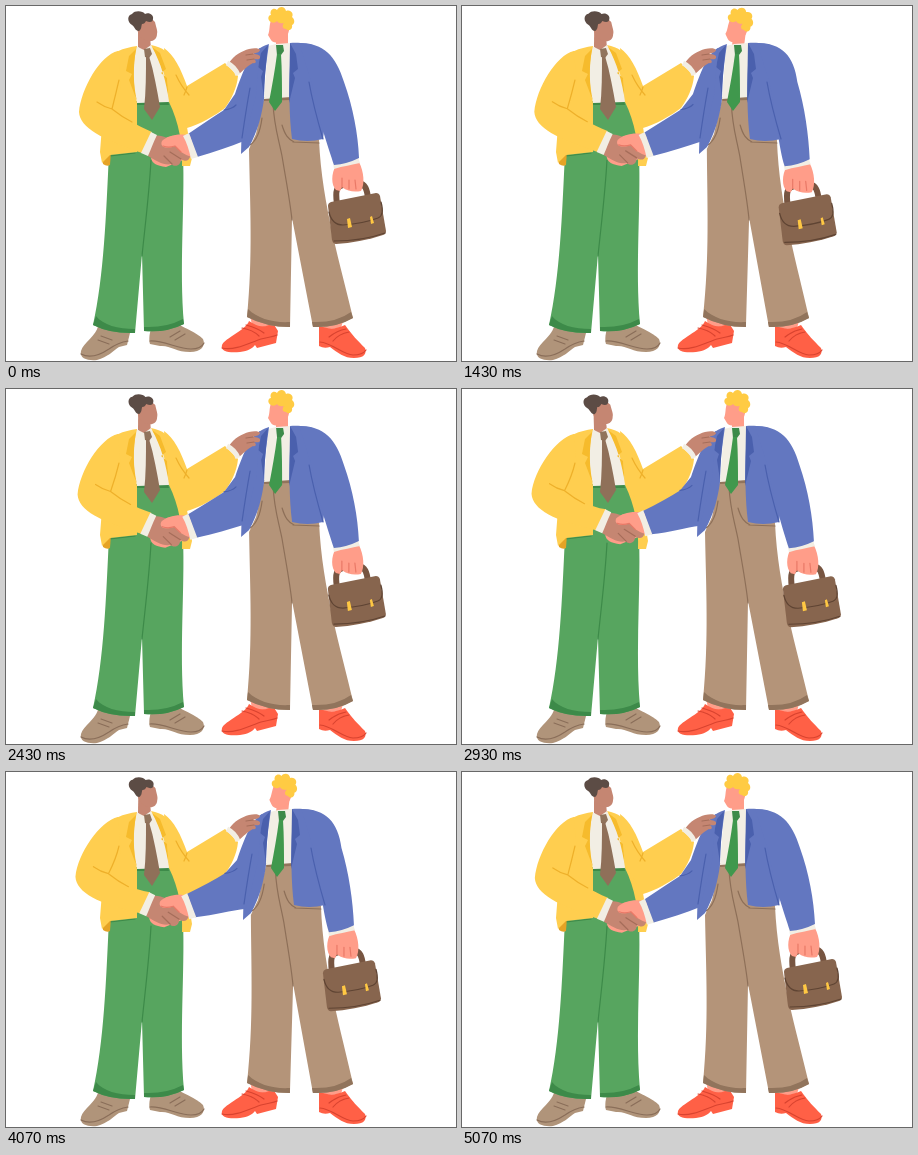
Write an HTML page that moves like this. It is 450 by 355 pixels and loops after 5.11 s.

```html
<!DOCTYPE html>
<html lang="en">
<head>
<meta charset="utf-8">
<title>Handshake</title>
<style>
html, body { margin: 0; width: 100%; height: 100%; overflow: hidden; background: #fff; }
svg { display: block; width: 450px; height: 355px; }
path { stroke-linecap: round; stroke-linejoin: round; }
.line { fill: none; stroke-width: 1.2; }
.yellow { fill: #ffce4f; } .yellowDark { fill: #f6bb2c; } .lining { fill: #e5a326; }
.blue { fill: #6377c0; } .blueDark { fill: #4a60ad; }
.green { fill: #57a55f; } .greenDark { fill: #3d8a49; }
.tan { fill: #b49479; } .tanDark { fill: #91745c; }
.shirt { fill: #f2eee4; }
.brown { fill: #c58672; } .peach { fill: #ff9d89; }
.taupe { fill: #b0947a; } .red { fill: #ff6046; }
.bag { fill: #87654e; }
.hair { fill: #5c4c45; } .blond { fill: #ffcb43; }
.sYellow { stroke: #eeb02a; } .sBlue { stroke: #4a60ad; }
.sGreen { stroke: #3d8a49; } .sTan { stroke: #8d6f58; }
.sBrown { stroke: #a56d5a; } .sPeach { stroke: #e97967; }
.sTaupe { stroke: #8a6e59; } .sRed { stroke: #d9432f; }
.sBag { stroke: #5f4433; } .sShirt { stroke: #f2eee4; }
</style>
</head>
<body>
<svg viewBox="0 0 450 355" xmlns="http://www.w3.org/2000/svg">
  <!-- shoes -->
  <path class="taupe" d="M92 320C91 329 77 337 75 345C73 353 83 355 91 354C102 351 107 345 113 341L121 339L124 327Z"/>
  <path class="line sTaupe" d="M75 348C84 353 94 349 103 343C110 338 115 336 122 335M95 330L106 334M92 334L103 338"/>
  <path class="taupe" d="M145 323C143 329 143 335 144 338L154 340C164 339 170 346 184 346C195 346 200 340 197 333C190 326 180 323 172 318Z"/>
  <path class="line sTaupe" d="M144 335C157 334 172 343 185 343C192 343 196 341 198 337M164 331L174 325M169 334L179 328"/>
  <path class="peach" d="M244 309L270 314L264 322L246 319Z"/>
  <path class="red" d="M243 315C240 324 219 332 216 339C214 346 224 347 234 346C242 345 247 342 249 339L251 342L270 337L272 325L267 317C258 323 250 320 243 315Z"/>
  <path class="line sRed" d="M216 342C229 345 243 337 255 333C262 331 267 331 271 329M236 322C242 323 249 326 253 330M240 319C247 321 253 323 258 327"/>
  <path class="peach" d="M314 315L338 312L335 322L319 323Z"/>
  <path class="red" d="M313 319L313 340Q318 343 324 341C332 347 338 352 348 352C358 352 361 348 359 342C352 335 346 329 339 319C329 324 320 323 313 319Z"/>
  <path class="line sRed" d="M314 336C326 337 336 348 347 349C354 349 358 347 360 344M327 335C331 330 337 327 343 326M323 331C328 327 334 324 340 323"/>

  <!-- trousers -->
  <g id="legsL">
    <path class="green" d="M130 95L163 95L177 118L177 148C179 200 173 262 178 318Q160 327 138 325L136 248L129 327Q105 328 87 319C98 270 100 210 103 147L130 140Z"/>
    <path class="greenDark" d="M87 319L90 310C97 319 112 323 129 323L129 327Q105 328 87 319ZM138 325L138 321Q160 322 177 313L178 318Q160 327 138 325Z"/>
    <path class="greenDark" d="M131 95L162 95L163 99L131 99Z"/>
    <path class="line sGreen" d="M145 154C143 190 139 220 136 250M104 150L129 147"/>
  </g>
  <g id="legsR">
    <path class="tan" d="M258 91L284 91L313 134C316 200 335 260 347 312Q330 322 307 321L286 212L284 321Q260 321 241 311C247 250 244 200 243 143L250 128Z"/>
    <path class="tanDark" d="M241 311L242 303C252 313 268 317 284 316L284 321Q260 321 241 311ZM307 321L306 316Q330 317 345 306L347 312Q330 322 307 321Z"/>
    <path class="tanDark" d="M258 91L284 90L284 94L258 95Z"/>
    <path class="line sTan" d="M267 97C268 120 272 130 276 150C281 180 284 195 286 214M256 112C254 128 250 135 244 139M276 119C279 129 282 133 288 136M287 136L313 137"/>
  </g>

  <!-- heads -->
  <g id="headL">
    <path class="brown" d="M132 20L144 31L145 42L138 47L132 41Z"/>
    <path class="brown" d="M131 15C136 10 146 12 149 16C150 21 152 25 151 28C151 33 147 36 142 35C134 33 130 27 131 15Z"/>
    <path class="hair" d="M126 19C121 16 121 9 126 8C129 4 137 5 139 8C143 6 148 9 147 13C147 16 144 17 140 15C139 17 138 18 136 18C135 20 136 23 133 25C129 25 129 21 126 19Z"/>
  </g>
  <g id="headR">
    <path class="peach" d="M270 27L282 25L282 41L270 42Z"/>
    <path class="peach" d="M265 14C263 20 264 25 262 29C263 31 264 32 265 34C267 38 275 37 279 32C285 27 284 16 281 12Z"/>
    <path class="blond" d="M265 16C261 14 262 9 265 9C263 4 268 1 271 4C273 0 279 0 280 5C285 3 288 8 286 11C289 13 289 18 286 19C287 23 283 26 280 23C276 23 276 19 278 17C273 18 272 16 271 15C269 17 267 17 265 16Z"/>
  </g>

  <!-- right torso -->
  <g id="torsoR">
    <path class="shirt" d="M262 40L270 38L284 37L285 91L258 93Z"/>
    <path class="greenDark" d="M270 39L277 39L278 45L275 49L271 49Z"/>
    <path fill="#40984d" d="M271 48L275 48C276 64 276 80 276 96L269 105L263 96C266 80 269 64 271 48Z"/>
    <path class="blue" d="M263 38C253 41 247 46 243 57L236 110L235 148L243 141C252 125 256 108 258 93C258 75 260 58 263 38Z"/>
    <path class="blue" d="M284 37C300 36 318 39 325 56L321 100L317 133Q301 137 286 133C283 110 283 80 284 60Z"/>
    <path class="blueDark" d="M262 39L255 47L252 61L257 65L255 71L258 91C258 74 260 57 262 39ZM284 37L290 48L292 63L287 67L289 72L283 97Z"/>
  </g>

  <!-- left torso -->
  <g id="torsoL">
    <path class="shirt" d="M130 40L138 44L145 39L160 68L163 96L131 97L125 68Z"/>
    <path class="tanDark" d="M138 43L144 42L146 48L143 52L139 51Z"/>
    <path fill="#8f7059" d="M140 50L143 50C148 66 151 84 154 101L146 114L138 103C140 86 140 67 140 50Z"/>
    <path class="lining" d="M95 145L97 158Q101 161 104 159L105 145Z"/>
    <path class="yellow" d="M131 40C118 42 104 46 98 57L96 120L94 146L96 157L104 149L131 146L131 97C127 80 126 60 131 40Z"/>
    <path class="yellow" d="M145 39C156 41 164 46 170 60L181 121L186 152L184 160L176 160C177 140 173 116 163 96C162 75 155 55 145 39Z"/>
    <path class="yellowDark" d="M130 43L123 50L120 65L126 68L123 74L131 95C127 79 127 60 130 43ZM146 41L154 47L160 63L155 67L161 72L163 95C160 75 155 57 146 41Z"/>
  </g>

  <path id="farSleeve" class="yellow"/>
  <path id="farCrease" class="line sYellow"/>

  <!-- clasped hands -->
  <path id="nearSleeve" class="yellow"/>
  <path id="nearCrease" class="line sYellow"/>
  <path id="blueSleeve" class="blue"/>
  <path id="blueCrease" class="line sBlue"/>
  <g id="grip">
    <path class="peach" d="M184 131C174 128 162 130 157 134L160 146L145 151C145 157 151 160 160 161L182 152L189 149Z"/>
    <path class="brown" d="M147 130C156 128 163 133 169 136C177 141 184 147 184 151C183 155 179 156 175 153C175 159 170 162 165 158C159 160 150 155 142 150Z"/>
    <path class="peach" d="M184 130C175 127 162 129 156 135C153 142 162 143 169 140L175 146C180 149 185 152 190 149Z"/>
    <path class="line sBrown" d="M164 146L175 153M158 150L166 158"/>
    <path class="line sPeach" d="M157 140C162 142 166 141 169 140L175 146"/>
    <path class="shirt" d="M145 126L151 129C147 137 145 143 142 150L135 147Z"/>
    <path class="shirt" d="M177 130L183 127L192 151L185 153C183 144 181 137 177 130Z"/>
  </g>

  <!-- briefcase arm -->
  <g id="case">
    <path class="line" stroke="#775541" style="stroke-width:6;stroke-linecap:butt" d="M331 198C329 184 331 180 337 179L353 177C359 178 361 183 362 192"/>
    <path class="bag" d="M325 196L370 187Q373 187 374 190L380 225Q380 228 377 229C362 234 345 237 330 238Q327 238 326 234L322 200Q322 197 325 196Z"/>
    <path class="line sBag" d="M323 206C325 215 329 219 337 219C352 218 364 215 372 212C377 210 377 203 375 196M328 235C345 235 362 233 379 227"/>
    <path fill="#ffc843" d="M341 213L344 212L346 221L342 222ZM364 211L366 210L368 217L365 218Z"/>
    <path class="peach" d="M330 159C325 168 325 179 330 184L334 185L336 181C342 186 349 186 355 185C359 178 358 166 353 156Z"/>
    <path class="line sPeach" d="M336 181L336 172M343 183L343 174M350 183L349 174"/>
    <path class="shirt" d="M327 157C335 157 344 154 352 151L354 157C346 159 337 160 328 163Z"/>
  </g>
  <path id="caseSleeve" class="blue"/>
  <path id="caseCrease" class="line sBlue"/>

  <!-- hand on the shoulder -->
  <path id="palm" class="brown"/>
  <path id="knuckles" class="line sBrown"/>
  <path id="patCuff" class="line sShirt" style="stroke-width:5;stroke-linecap:butt"/>
</svg>
<script>
const LOOP = 5110, HALF = LOOP / 2;
const el = id => document.getElementById(id);
const shape = (id, d) => el(id).setAttribute('d', d);
const place = (id, t) => el(id).setAttribute('transform', t);

// [time, value] steps joined by cosine easing, repeated twice per loop
const shakeSteps = [[0, .5], [330, 0], [610, 1], [920, 0], [1270, 1], [1560, 0], [1930, 1], [2250, 0], [HALF, .5]];
const patSteps = [[0, 0], [480, 0], [760, 1], [880, 1], [1090, 0], [HALF, 0]];
const leanLSteps = [[0, 0], [400, 0], [820, 1], [1050, 1], [1450, 0], [HALF, 0]];
const leanRSteps = [[0, 0], [800, 0], [1450, 1], [2000, 1], [2500, 0], [HALF, 0]];
const tiltSteps = [[0, 0], [650, 0], [1450, 1], [2200, 0], [HALF, 0]];

// resting and lifted outlines share their commands
const palmDown = 'M223 57C228 49 236 45 243 43C248 42 253 42 254 44C254 46 250 47 247 48C251 48 255 49 254 52C253 54 250 53 248 53C251 55 250 58 247 57C241 60 238 64 233 68Z';
const palmUp = 'M212 52C214 44 218 38 225 33C229 29 235 23 238 26C239 29 236 32 234 34C237 30 241 27 243 30C244 33 241 36 239 39C242 37 245 39 242 42C238 48 231 51 226 59Z';

function track(steps, t) {
  const i = Math.max(1, steps.findIndex(s => s[0] >= t));
  const [t0, a] = steps[i - 1], [t1, b] = steps[i];
  return a + (b - a) * (1 - Math.cos(Math.PI * (t - t0) / (t1 - t0))) / 2;
}

function blend(a, b, k) {
  const ends = b.match(/-?[\d.]+/g);
  let i = 0;
  return a.replace(/-?[\d.]+/g, n => +n + (ends[i++] - n) * k);
}

const shift = (dx, dy) => (x, y) => `${x + dx} ${y + dy}`;

// shear with the hem standing still
const shear = (dx, hem, waist) => {
  const k = -dx / (hem - waist);
  return `matrix(1 0 ${k} 1 ${-k * hem} 0)`;
};

function draw(time) {
  const t = time % HALF, wave = 2 * Math.PI * t / HALF;
  const shake = track(shakeSteps, t) - .5;
  const pat = track(patSteps, t);
  const leanL = -2 * track(leanLSteps, t), leanR = 2 * track(leanRSteps, t);
  const swing = -2.75 * (1 - Math.cos(wave));
  const left = shift(leanL, 0), right = shift(leanR, 0);

  place('legsL', shear(leanL, 320, 130));
  place('legsR', shear(leanR, 315, 130));
  place('torsoL', `translate(${leanL})`);
  place('torsoR', `translate(${leanR})`);
  place('headL', `translate(${leanL * .2}) rotate(${-2 * Math.sin(wave)} 139 40)`);
  place('headR', `rotate(${7 * track(tiltSteps, t)} 273 40)`);

  const gx = 4 * shake, gy = 13 * shake, grip = shift(gx, gy);
  place('grip', `translate(${gx} ${gy})`);
  const elbow = shift(73 + 8 * shake, 106 + 3 * shake);
  shape('nearSleeve', `M${left(112, 45)}C${left(94, 49)} ${elbow(2, -23)} ${elbow(0, 0)}` +
    `C${elbow(1, 16)} ${elbow(23, 27)} ${grip(136, 147)}L${grip(146, 126)}` +
    `C${elbow(57, 13)} ${elbow(42, 4)} ${elbow(33, -2)}L${left(115, 82)}Z`);
  shape('nearCrease', `M${left(113, 74)}Q${left(110, 87)} ${elbow(33, -3)}` +
    `Q${elbow(43, 5)} ${elbow(53, 10)}M${elbow(33, -3)}Q${elbow(25, -5)} ${elbow(18, -10)}`);

  const bend = shift(leanR * .5, 6 * shake);
  shape('blueSleeve', `M${right(254, 42)}C${right(243, 48)} ${right(236, 68)} ${right(229, 88)}L${bend(218, 104)}` +
    `Q${bend(204, 113)} ${grip(182, 128)}L${grip(191, 151)}` +
    `C${bend(208, 146)} ${bend(224, 141)} ${right(238, 135 + 4 * -shake)}L${right(250, 90)}Z`);
  shape('blueCrease', `M${right(244, 82)}Q${right(240, 104)} ${right(236, 132)}M${bend(218, 104)}Q${bend(226, 103)} ${bend(230, 99)}`);

  shape('palm', blend(palmDown, palmUp, pat));
  shape('knuckles', blend('M247 48L240 49M248 53L241 54', 'M234 34L229 39M239 39L233 44', pat));
  shape('patCuff', blend('M221 57Q229 61 232 69', 'M212 51Q220 54 225 61', pat));
  shape('farSleeve', `M${left(158, 42)}C${left(168, 49)} ${left(175, 63)} ${left(181, 80)}` +
    blend('L219 57L232 70C231 82', 'L210 52L224 63C222 80', pat) +
    ` ${left(225, 94)} ${left(219, 102)}C${left(210, 109)} ${left(193, 119)} ${left(181, 122)}L${left(163, 92)}Z`);
  shape('farCrease', `M${left(170, 69)}Q${left(175, 80)} ${left(183, 89)}M${left(181, 81)}Q${left(180, 85)} ${left(178, 89)}`);

  const hang = shift(swing, -.25 * swing);
  place('case', `translate(${swing} ${-.25 * swing})`);
  shape('caseSleeve', `M${right(293, 37)}C${right(318, 37)} ${right(330, 50)} ${338 + swing * .5} 76` +
    `C${347 + swing * .8} 101 ${hang(352, 128)} ${hang(353, 152)}Q${hang(341, 158)} ${hang(328, 159)}` +
    `C${hang(322, 140)} ${right(313, 116)} ${right(306, 78)}Z`);
  shape('caseCrease', `M${right(303, 76)}C${right(307, 99)} ${right(312, 116)} ${right(317, 133)}`);
}

function frame() {
  draw(performance.now() % LOOP);
  requestAnimationFrame(frame);
}
frame();
</script>
</body>
</html>
```
